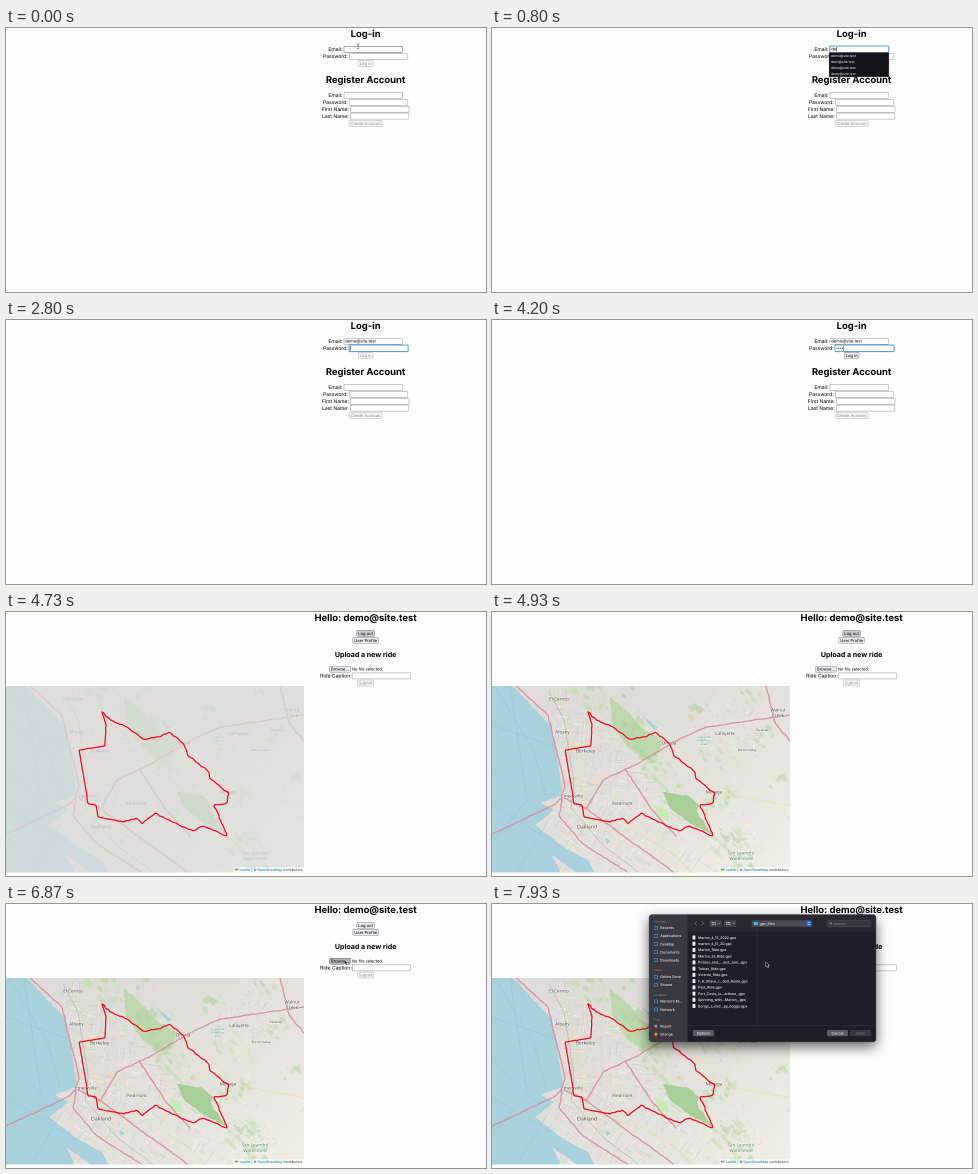
These frames come from a looping animation (480 by 264 pixels, 8 s). An HTML page with a canvas:

```html
<!DOCTYPE html>
<html lang="en">
<head>
<meta charset="utf-8">
<title>Ride upload</title>
<style>
html, body { margin: 0; width: 100%; height: 100%; overflow: hidden; background: #fdfdfd; }
canvas { display: block; width: 480px; height: 264px; }
</style>
</head>
<body>
<canvas id="stage"></canvas>
<script>
const W = 480, H = 264, LOOP = 8000, MID = 359.6;
const UI = 'Inter, sans-serif', MAP = '"Noto Sans", sans-serif';
const EMAIL = 'demo@site.test';
// Drawn at double size so that tiny text stays smooth
const SCALE = 2 * Math.max(1, window.devicePixelRatio || 1);

function layer(canvas, w, h) {
  canvas.width = w * SCALE;
  canvas.height = h * SCALE;
  const ctx = canvas.getContext('2d');
  ctx.scale(SCALE, SCALE);
  ctx.textRendering = 'geometricPrecision';
  ctx.lineJoin = ctx.lineCap = 'round';
  return ctx;
}
const stage = layer(document.getElementById('stage'), W, H);
let c = stage;

// ---------- helpers ----------
const clamp = v => Math.max(0, Math.min(1, v));
const ramp = (t, a, b) => clamp((t - a) / (b - a));
const smooth = k => k * k * (3 - 2 * k);
const mix = (a, b, k) => a + (b - a) * k;
const typed = (t, from, step) => Math.max(0, Math.floor((t - from) / step + 1.001));

function random(seed) {
  return () => (seed = (seed * 16807) % 2147483647) / 2147483647;
}

function textWidth(s, size, weight = 400, family = UI) {
  c.font = `${weight} ${size}px ${family}`;
  return c.measureText(s).width;
}

function text(s, x, y, size, color = '#000', { weight, family, align = 'left', halo } = {}) {
  const w = textWidth(s, size, weight, family);
  c.textAlign = align;
  if (halo) {
    c.strokeStyle = halo;
    c.lineWidth = 0.9;
    c.strokeText(s, x, y + size * 0.36);
  }
  c.fillStyle = color;
  c.fillText(s, x, y + size * 0.36);
  return w;
}

function box(x, y, w, h, r, fill, stroke, lw = 0.5) {
  c.beginPath();
  c.roundRect(x, y, w, h, r);
  if (fill) { c.fillStyle = fill; c.fill(); }
  if (stroke) { c.strokeStyle = stroke; c.lineWidth = lw; c.stroke(); }
}

function dot(x, y, r, color) {
  c.beginPath();
  c.arc(x, y, r, 0, 7);
  c.fillStyle = color;
  c.fill();
}

function line(path, color, lw, dash = []) {
  c.strokeStyle = color;
  c.lineWidth = lw;
  c.setLineDash(dash);
  c.stroke(typeof path === 'string' ? new Path2D(path) : path);
  c.setLineDash([]);
}

function area(path, color) {
  c.fillStyle = color;
  c.fill(path);
}

// A soft path through "x,y x,y ..." that wanders sideways by up to `wobble`
function trail(spec, wobble = 0, path = new Path2D()) {
  const key = spec.split(' ').map(p => p.split(',').map(Number));
  const rnd = random(90210), pts = [key[0]];
  key.slice(1).forEach(([bx, by], i) => {
    const [ax, ay] = key[i], n = Math.ceil(Math.hypot(bx - ax, by - ay) / 3);
    for (let j = 1; j <= n; j++) {
      const off = () => j < n ? (rnd() * 2 - 1) * wobble : 0;
      pts.push([mix(ax, bx, j / n) + off(), mix(ay, by, j / n) + off()]);
    }
  });
  path.moveTo(...pts[0]);
  for (let i = 1; i < pts.length - 1; i++) {
    const [x, y] = pts[i], [nx, ny] = pts[i + 1];
    path.quadraticCurveTo(x, y, (x + nx) / 2, (y + ny) / 2);
  }
  path.lineTo(...pts[pts.length - 1]);
  return path;
}

// ---------- form parts ----------
const heading = (s, y, size = 9.45) => text(s, MID, y, size, '#000', { weight: 700, align: 'center' });

function caret(x, y) {
  c.fillStyle = '#000';
  c.fillRect(x, y, 0.5, 4.6);
}

// A centred label and input; returns the left edge of the input
function field(label, y, mode, gap = 1.3) {
  const w = textWidth(label, 5), left = MID - (w + gap + 59.2) / 2, x = left + w + gap;
  text(label, left, y, 5);
  box(x + 0.3, y - 2.9, 58.6, 6, 0.5, '#fff', mode === 'hover' ? '#55555e' : '#94949d');
  if (mode === 'focus') box(x, y - 3.2, 59.2, 6.6, 0.8, null, '#4fa5e0', 1);
  return x;
}

const BUTTON = {
  off: ['#f6f6f7', '#b4b4ba', '#8e8e92'],
  on: ['#eaeaee', '#85858f', '#000'],
  hover: ['#cdcdd4', '#6f6f79', '#000'],
  down: ['#b3b3bb', '#5f5f69', '#000']
};

function button(label, y, state, mid = MID) {
  const [fill, edge, ink] = BUTTON[state], w = textWidth(label, 4.1) + 3;
  box(mid - w / 2, y - 3, w, 6, 1, fill, edge);
  text(label, mid, y, 4.1, ink, { align: 'center' });
}

// ---------- sign-in page ----------
const known = ['demo', 'demi', 'dema', 'demy', 'ride', 'news'].map(s => s + '@site.test');

function signIn(t) {
  const focus = t < 130 ? '' : t < 2670 ? 'email' : 'pass';
  const filled = t >= 2470;
  const email = filled ? EMAIL : EMAIL.slice(0, typed(t, 530, 200));
  const dots = Math.min(4, typed(t, 3330, 266.6));

  heading('Log-in', 5.5);
  const ex = field('Email:', 21.2, focus === 'email' ? 'focus' : t < 130 ? 'hover' : '');
  const px = field('Password:', 28.2, focus === 'pass' ? 'focus' : '');
  button('Log in', 35.5, dots === 4 ? 'on' : 'off');

  const w = text(email, ex + 1.4, 21.2, 4.2);
  if (focus === 'email') caret(ex + 1.7 + w, 19);
  for (let i = 0; i < dots; i++) dot(px + 2 + i * 1.85, 28.3, 0.55, '#111');
  if (focus === 'pass') caret(px + 1.2 + dots * 1.85, 26);

  heading('Register Account', 51.5);
  ['Email:', 'Password:', 'First Name:', 'Last Name:'].forEach((s, i) => field(s, 67.3 + i * 6.9));
  button('Create Account', 95.4, 'off');

  if (focus === 'email' && !filled) {
    const rows = known.filter(s => s.startsWith(email));
    box(ex - 0.6, 24.6, 59.8, rows.length * 6 + 0.3, 0.6, '#15131a', '#3c3a42', 0.3);
    rows.forEach((s, i) => text(s, ex + 1.2, 27.8 + i * 6, 3.4, '#f4f4f6'));
  }
  if (t < 530) beam(352, 18.5 + 2 * smooth(ramp(t, 50, 150)));
}

// ---------- map ----------
const route = trail('96,100 104,108 121,115 137,127 153,125 163,120 177,131 182,144 203,160 204,167 223,181 221,191 208,193 221,224 198,214 187,219 160,207 149,201 136,212 130,206 118,210', 0.9);
trail('118,210 92,205 90,193 82,192 79,172 73,138 99,134 100,112 96,100', 0.25, route);

const ridge = y => 100 + (y - 80) * 0.86;
const inTown = (x, y) => x < ridge(y) - 22;

function woods(rnd) {
  for (let i = 0; i < 1500; i++) {
    const x = 80 + rnd() * 218, y = 74 + rnd() * 187, d = (x - ridge(y)) / 20;
    if (inTown(x, y)) continue;
    const patch = Math.sin(x / 13 + y / 21) * Math.sin(y / 12 - x / 31);
    const cover = Math.exp(-d * d) + 0.75 * patch;
    if (cover < 0.3 + rnd() * 0.5) continue;
    c.globalAlpha = 0.45;
    c.fillStyle = ['#add19e', '#c8e2b0', '#bfdda9'][i % 3];
    c.beginPath();
    c.ellipse(x, y, 1 + rnd() * 4, 0.7 + rnd() * 2, 0.8, 0, 7);
    c.fill();
  }
  c.globalAlpha = 1;
}

function streets(rnd) {
  for (let i = 0; i < 1500; i++) {
    const x = 55 + rnd() * 243, y = 74 + rnd() * 187, town = inTown(x, y);
    if (!town && Math.sin(x / 17) + Math.cos(y / 19) < rnd()) continue;
    const tilt = town ? (y > 185 ? 0.55 : 0.1) : rnd() * 3;
    const a = tilt + (i % 2) * Math.PI / 2, l = 2 + rnd() * (town ? 10 : 4);
    line(`M${x} ${y}l${Math.cos(a) * l} ${Math.sin(a) * l}`, i % 3 ? '#f6f5f2' : '#c6c2c0', 0.35);
  }
}

function roads() {
  ['64,80 80,120 91,189 99,214', '72,137 104,129', '84,180 104,169 140,198', '94,215 125,207 183,244 201,262',
    '182,131 216,166 224,180 298,194', '223,119 249,159'].forEach(s => line(trail(s, 0.7), '#f3dba8', 0.8));
  line(trail('57,80 72,108 82,171 79,196 113,235 149,262', 0.4), '#a5a0a2', 0.5);
  ['24,74 56,103 73,174 69,188', '0,222 62,193 70,185 93,196 146,234 184,262', '70,188 67,204 91,232 138,262',
    '94,197 111,168 145,152 180,131 214,115 298,103', '133,157 161,199 184,224', '274,74 283,111 298,129']
    .map(s => trail(s, 0.5)).forEach(p => {
      line(p, '#cf7088', 1.15);
      line(p, '#e8a0a9', 0.6);
    });
}

function labels() {
  const place = (s, x, y, size = 4.5, color = '#4a474c') =>
    s.split('\n').forEach((row, i) =>
      text(row, x, y + i * size * 1.17, size, color, { family: MAP, align: 'center', halo: 'rgba(255,255,255,.6)' }));
  place('El Cerrito', 67, 87);
  place('Albany', 70.5, 120);
  place('Berkeley', 93.5, 139, 4.8);
  place('Emeryville', 80, 184);
  place('Piedmont', 130.5, 191.5);
  place('Oakland', 95, 214.5, 5.2);
  place('Orinda', 177, 131);
  place('Lafayette', 233, 121.5);
  place('Moraga', 222, 180);
  place('Walnut\nCreek', 286, 98);
  place('Saranap', 270, 118, 3.2);
  place('Burton Valley', 255, 138, 3);
  place('Lafayette\nReservoir\nArea', 212, 125, 3, '#609460');
  place('San Leandro\nWatershed', 249, 241, 4.6, '#568b56');
}

function tileLayer() {
  const canvas = document.createElement('canvas'), rnd = random(41713);
  c = layer(canvas, 298, H);

  const land = c.createLinearGradient(100, 110, 270, 262);
  land.addColorStop(0, '#dedcd8');
  land.addColorStop(0.6, '#e4e3dc');
  land.addColorStop(1, '#eeeee5');
  c.fillStyle = land;
  c.fillRect(0, 74, 298, 187);
  woods(rnd);
  streets(rnd);

  area(trail('118,85 134,98 150,116 171,128 167,142 155,149 136,136 120,112', 1), 'rgba(173,213,152,.65)');
  area(trail('171,180 197,184 207,193 205,200 220,222 197,211 178,196', 0.8), '#a8cf97');
  area(trail('163,194 175,199 177,209 168,206', 0.6), '#c4edb2');
  area(trail('150,103 166,116 162,118', 0.4), '#a9d1dd');
  area(trail('207,126 215,127 210,131', 0.4), '#a9d1dd');
  area(trail('113,226 119,229 115,232', 0.3), '#a9d1dd');

  area(trail('0,74 21,74 49,104 59,113 67,157 71,183 49,190 62,198 43,213 73,236 96,248 103,262 86,262 60,243 69,262 0,262', 0.7), '#a9d1dd');
  ['3,74 42,140 54,183', '0,113 61,134', '18,74 35,188 0,232', '0,156 52,205', '0,193 60,229', '24,262 55,211']
    .forEach(s => line(trail(s), '#8ab6cd', 0.45, [2, 1.5]));
  roads();
  labels();
  c = stage;
  return canvas;
}
const tiles = tileLayer();

function attribution() {
  const parts = [['Leaflet', '#0078a8'], [' | © ', '#333'], ['OpenStreetMap', '#0078a8'], [' contributors', '#333']];
  let x = 296.5 - parts.reduce((sum, [s]) => sum + textWidth(s, 3.35), 0);
  c.fillStyle = 'rgba(255,255,255,.8)';
  c.fillRect(x - 6, 255.4, 304 - x, 5);
  ['#4c7be1', '#ffd500'].forEach((color, i) => {
    c.fillStyle = color;
    c.fillRect(x - 4.8, 256.7 + i * 1.2, 3.6, 1.2);
  });
  for (const [s, color] of parts) x += text(s, x, 258, 3.35, color);
}

function map(t) {
  c.save();
  c.beginPath();
  c.rect(0, 74, 298, 186.4);
  c.clip();
  c.fillStyle = '#ddd';
  c.fillRect(0, 74, 298, 187);
  c.globalAlpha = ramp(t, 4670, 4880);
  c.drawImage(tiles, 0, 0, 298, H);
  c.globalAlpha = 1;
  if (t >= 4530) line(route, '#ee0a1c', 1.25);
  attribution();
  c.restore();
}

// ---------- ride page ----------
function rides(t) {
  heading('Hello: ' + EMAIL, 5.5);
  button('Log out', 21.4, t < 5330 ? 'hover' : 'on');
  button('User Profile', 28.3, 'on');
  heading('Upload a new ride', 42.6, 7.05);
  button('Browse...', 57.2, t < 6070 ? 'on' : t < 6800 ? 'hover' : t < 7330 ? 'down' : 'on', 334);
  text('No file selected.', 346, 57.2, 4.05);
  field('Ride Caption:', 63.8, '', 0.2);
  button('Submit', 71, 'off');
  map(t);
}

// ---------- file dialog ----------
const files = ['Marlon_4_15_2022', 'marlon_4_15_20', 'Marlon_Ride', 'Marlon_Sr_Ride', 'Pickles_and_...and_Jam_',
  'Tobias_Ride', 'Vicente_Ride', 'F_A_Shave_r...ded_Route', 'Paul_Ride', 'Port_Costa_lo...artinez_',
  'Spinning_with...Marlon_', 'Bongo_s_mid...py_doggo'];
const places = {
  Favorites: ['Recents', 'Applications', 'Desktop', 'Documents', 'Downloads'],
  Cloud: ['Online Drive', 'Shared'],
  Locations: ['Marlon’s M...', 'Network'],
  Tags: ['Report', 'Orange']
};

function sidebar() {
  let y = 17.3;
  for (const [title, items] of Object.entries(places)) {
    text(title, 162, y, 2.7, '#85838c', { weight: 600 });
    y += 6.6;
    for (const s of items) {
      if (title === 'Tags') dot(163.9, y, 1.6, s === 'Orange' ? '#f08a32' : '#8a8a90');
      else box(162.3, y - 1.5, 3.3, 3, 0.8, null, '#359bee', 0.7);
      text(s, 168.3, y, 3.55, '#efeef2', { weight: 500 });
      y += 8.05;
    }
    y += 2;
  }
}

function toolbar() {
  line('M204.8 17.7l-2 1.8 2 1.8M209.7 17.7l2 1.8-2 1.8', '#77757e', 0.6);
  for (const x of [217.5, 232]) {
    box(x, 16.2, 12.2, 6.6, 1.3, '#45434c');
    for (let i = 0; i < 6; i++) box(x + 2.3 + (i % 3) * 1.5, i < 3 ? 18 : 19.8, 0.9, 1.1, 0, '#d1d0d5');
    line(`M${x + 8.8} 19l.9 1 .9-1`, '#c9c8cf', 0.5);
  }
  box(259.7, 16.2, 60.2, 6.6, 1.3, '#4b4953');
  box(261.8, 18, 4, 3.1, 0.5, '#40b4ed');
  text('gpx_files', 267.5, 19.5, 3.6, '#f0eff3', { weight: 500 });
  box(314.4, 16.7, 5, 5.6, 1.1, '#246ee0');
  line('M316 19l.9-1 .9 1M316 20.2l.9 1 .9-1', '#fff', 0.5);
  box(335, 16.2, 43, 6.6, 1.3, '#37353e', '#5a5861', 0.4);
  line('M339.3 20l.9 1M339.5 19.2a1 1 0 1 0-2 0a1 1 0 1 0 2 0', '#bbbac0', 0.4);
  text('Search', 342, 19.5, 3.5, '#8b8992');
}

function dialog(t) {
  c.save();
  c.globalAlpha = ramp(t, 6990, 7200);
  c.shadowColor = 'rgba(0,0,0,.6)';
  c.shadowBlur = 13 * SCALE;
  c.shadowOffsetY = 5 * SCALE;
  box(157, 10.5, 227, 127.5, 3, '#1f1d27');
  c.shadowColor = 'transparent';
  box(157, 10.5, 38.5, 127.5, [3, 0, 0, 3], '#3a3841');
  box(195.5, 10.5, 188.5, 17, [0, 3, 0, 0], '#292731');
  c.fillStyle = '#3a3942';
  c.fillRect(264.8, 27.8, 0.5, 93.7);
  c.fillRect(195.5, 121.5, 188.5, 0.5);
  box(157, 10.5, 227, 127.5, 3, null, '#5b5962', 0.4);
  sidebar();
  toolbar();

  files.forEach((s, i) => {
    const y = 33.5 + i * 6.23;
    box(200.5, y - 2, 2.9, 4, 0.3, '#ececf0');
    text(s + '.gpx', 206, y, 3.55, '#efeef2', { weight: 500 });
  });
  [['Options', 201], ['Cancel', 335], ['Open', 358]].forEach(([s, x]) => {
    const off = s === 'Open';
    box(x, 126, 21, 6.2, 1.3, off ? '#38363f' : '#5b5963');
    text(s, x + 10.5, 129.1, 3.6, off ? '#75737c' : '#f5f5f7', { align: 'center', weight: 500 });
  });
  c.restore();
}

// ---------- pointer ----------
function beam(x, y) {
  line(`M${x} ${y - 2.2}v4.4M${x - 1} ${y - 2.6}l1 .4 1-.4M${x - 1} ${y + 2.6}l1-.4 1 .4`, '#222', 0.5);
}

function pointer(t) {
  if (t < 5270) return;
  // Swings out to the right, settles on Browse, then goes to the file list
  const k = smooth(ramp(t, 5270, 6200)), go = smooth(ramp(t, 7430, 7930));
  const x = mix(362, 338.5, k) + 24 * Math.sin(Math.PI * k), y = mix(22, 56, k);
  c.save();
  c.translate(mix(x, 274, go), mix(y, 58.5, go));
  const arrow = new Path2D('M0 0V4.2L1 3.3 1.7 4.9 2.4 4.6 1.7 3H3Z');
  line(arrow, '#fff', 0.8);
  area(arrow, '#000');
  c.restore();
}

function draw(t) {
  c.fillStyle = '#fdfdfd';
  c.fillRect(0, 0, W, H);
  if (t < 4470) return signIn(t);
  rides(t);
  if (t >= 6990) dialog(t);
  pointer(t);
}

const start = performance.now();
function tick() {
  draw((performance.now() - start) % LOOP);
  requestAnimationFrame(tick);
}
tick();
</script>
</body>
</html>
```
